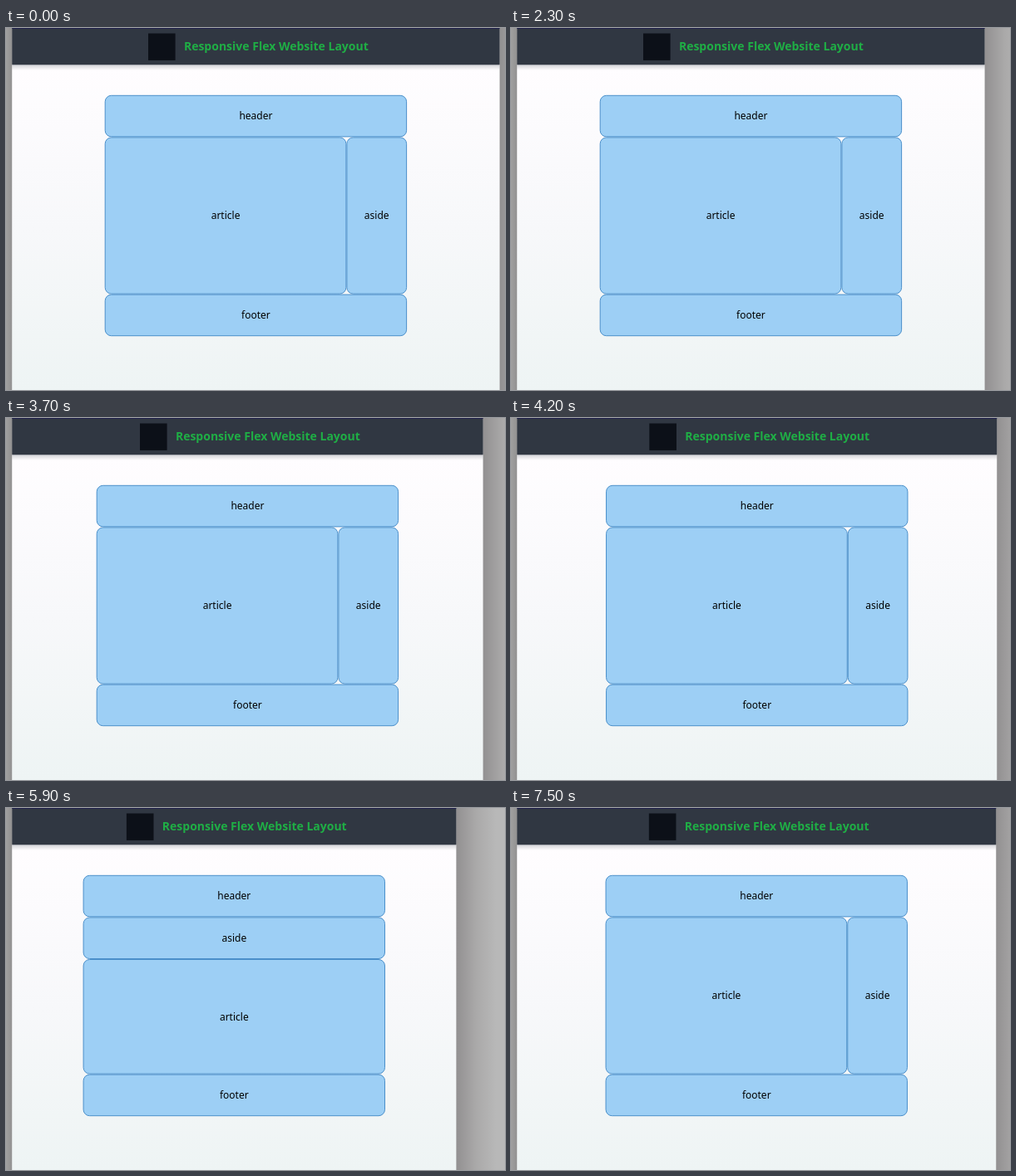
An HTML page that plays this animation: 600 px wide and 436 px high, repeating every 7800 ms.

```html
<!DOCTYPE html>
<html lang="en">
<head>
<meta charset="utf-8">
<title>Responsive Flex Website Layout</title>
<style>
  html, body { margin: 0; height: 100%; overflow: hidden; }
  svg { display: block; width: 600px; height: 436px; background: #b8b8b8; }
  text { font: 12px "Noto Sans", "Open Sans", sans-serif; text-anchor: middle; }
  .title { font-size: 14px; font-weight: 600; fill: #1fae45; text-anchor: start; }
  .box rect { fill: #9dcff5; stroke: #4a8fca; }
</style>
</head>
<body>
<svg viewBox="0 0 600 436">
  <defs>
    <linearGradient id="paper" x2="0" y2="1">
      <stop stop-color="#fffdff"/><stop offset=".5" stop-color="#f7f8fa"/><stop offset="1" stop-color="#eef4f4"/>
    </linearGradient>
    <linearGradient id="navShade" x2="0" y2="1">
      <stop stop-color="#303742" stop-opacity=".22"/><stop offset="1" stop-color="#303742" stop-opacity="0"/>
    </linearGradient>
    <linearGradient id="leftShade">
      <stop stop-color="#a0a0a0"/><stop offset="1" stop-color="#929191"/>
    </linearGradient>
    <linearGradient id="rightShade">
      <stop stop-color="#929091"/><stop offset=".5" stop-color="#aaa9a9"/><stop offset="1" stop-color="#b8b8b8"/>
    </linearGradient>
  </defs>
  <rect width="7.3" height="436" fill="url(#leftShade)"/>
  <rect id="shade" width="48" height="436" fill="url(#rightShade)"/>
  <rect class="wide" x="7.3" y="44" height="392" fill="url(#paper)"/>
  <rect class="wide" x="7.3" y="44" height="7" fill="url(#navShade)"/>
  <rect class="wide" x="7.3" height="44.3" fill="#303742"/>
  <rect class="wide" x="7.3" height="1" fill="#20204c"/>
  <g id="content">
    <rect x="-129.4" y="6.5" width="32.6" height="32.4" fill="#0c1018"/>
    <text class="title" x="-86.5" y="27.2">Responsive Flex Website Layout</text>
  </g>
</svg>
<script>
const LOOP = 7800, STEP = 100, LEFT = 7.3, BREAKPOINT = 565;

// [time in ms, right edge of the window]
const drag = [
  [0, 593.5], [1600, 593], [1800, 591], [2300, 569.5], [2400, 564.3], [2850, 541],
  [3100, 543.5], [3200, 546.5], [3700, 573.5], [4000, 583], [4200, 584.2], [4500, 584.2],
  [4900, 561], [5300, 541.8], [5550, 540], [5900, 541.3], [6100, 549], [6500, 570],
  [6900, 583.2], [LOOP, 583.2]
];

const slope = i => (drag[i + 1][1] - drag[i][1]) / (drag[i + 1][0] - drag[i][0]);

// Harmonic mean keeps the curve free of overshoot.
const tangents = drag.map((_, i) => {
  if (!i || i === drag.length - 1) return 0;
  const a = slope(i - 1), b = slope(i);
  return a * b > 0 ? 2 * a * b / (a + b) : 0;
});

function rightEdge(t) {
  const i = drag.findIndex((p, k) => k && t <= p[0]) - 1;
  const [t0, r0] = drag[i], [t1, r1] = drag[i + 1];
  const span = t1 - t0, u = (t - t0) / span, v = 1 - u;
  return r0 * (1 + 2 * u) * v * v + r1 * (3 - 2 * u) * u * u
    + span * u * v * (tangents[i] * v - tangents[i + 1] * u);
}

const content = document.getElementById("content");
const shade = document.getElementById("shade");
const wide = document.querySelectorAll(".wide");

function add(parent, tag, attributes) {
  const node = document.createElementNS("http://www.w3.org/2000/svg", tag);
  for (const name in attributes) node.setAttribute(name, attributes[name]);
  return parent.appendChild(node);
}

function addBox(parent, name, x, y, width, height) {
  const box = add(parent, "g", { class: "box" });
  add(box, "rect", { x: x + .5, y: y + .5, width: width - 1, height: height - 1, rx: 7.5 });
  add(box, "text", { x: x + width / 2, y: y + height / 2 + 4.3 }).textContent = name;
}

addBox(content, "header", -181.7, 80.8, 363.4, 50.6);
addBox(content, "footer", -181.7, 320.6, 363.4, 50.6);

const row = add(content, "g");
addBox(row, "article", -181.7, 131.4, 290.7, 189.2);
addBox(row, "aside", 109, 131.4, 72.7, 189.2);

const stack = add(content, "g");
addBox(stack, "aside", -181.7, 131.4, 363.4, 50.6);
addBox(stack, "article", -181.7, 182, 363.4, 138.6);

function draw(now) {
  const right = rightEdge(Math.floor(now % LOOP / STEP) * STEP);
  const isRow = right > BREAKPOINT;
  for (const rect of wide) rect.setAttribute("width", right - LEFT);
  shade.setAttribute("x", right);
  content.setAttribute("transform", `translate(${(LEFT + right) / 2} 0)`);
  row.style.display = isRow ? "" : "none";
  stack.style.display = isRow ? "none" : "";
  requestAnimationFrame(draw);
}
requestAnimationFrame(draw);
</script>
</body>
</html>
```
